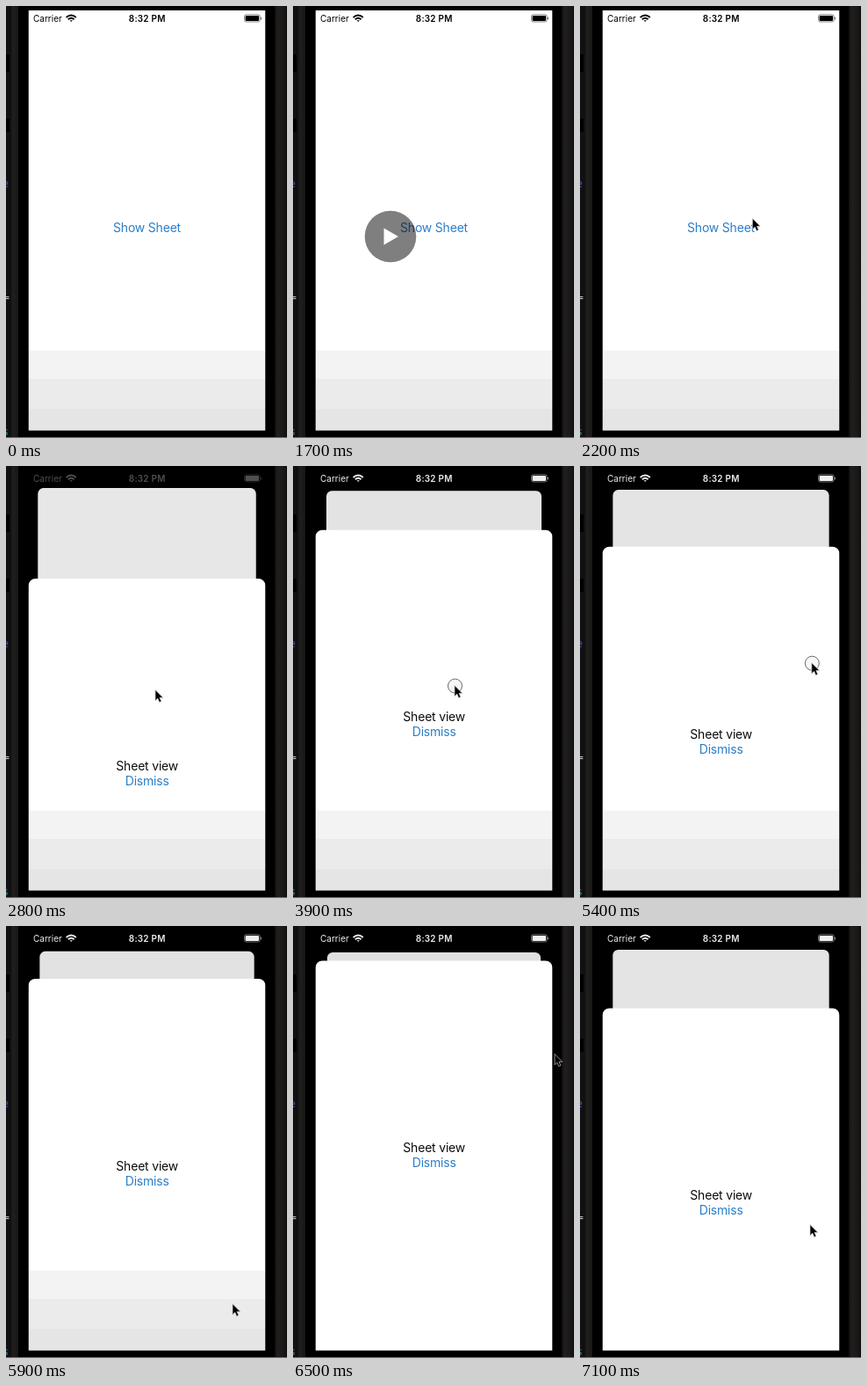
An HTML page that plays this animation: 320x491 px, repeating every 7200 ms.

```html
<!DOCTYPE html>
<html lang="en">
<head>
<meta charset="utf-8">
<title>Sheet demo</title>
<style>
  html, body { margin: 0; width: 100%; height: 100%; overflow: hidden; background: #000; }
  svg { display: block; width: 320px; height: 491px; font-family: Inter, Roboto, sans-serif; }
  .label { font-size: 14px; letter-spacing: -.2px; text-anchor: middle; fill: #0c0c0c; }
  .link { fill: #2a7ec9; }
  .status { font-size: 10px; }
  .code { font: 12px "DejaVu Sans Mono", monospace; text-anchor: end; }
</style>
</head>
<body>
<svg viewBox="0 0 320 491">
  <defs>
    <clipPath id="screen"><rect x="25.5" y="5" width="270" height="477.5"/></clipPath>
    <linearGradient id="rim">
      <stop offset="0" stop-color="#0b0b0a"/>
      <stop offset=".35" stop-color="#201f1d"/>
      <stop offset="1" stop-color="#171614"/>
    </linearGradient>
  </defs>

  <!-- editor behind the phone, and the phone's rim -->
  <rect width="320" height="491" fill="#111114"/>
  <text class="code" x="3" y="206" fill="#65489a">e</text>
  <text class="code" x="4" y="335" fill="#c8c8c8">=</text>
  <text class="code" x="3" y="488" fill="#3f8f85">s</text>
  <path d="M0 55h4v20h-4zM0 128h4v15h-4z" fill="#000"/>
  <rect x="4" width="11" height="490" fill="url(#rim)"/>
  <rect x="305" width="13" height="490" fill="url(#rim)"/>
  <rect x="14" width="292" height="490" fill="#000"/>
  <rect y="490" width="320" height="1" fill="#17b800"/>

  <g clip-path="url(#screen)">
    <g id="card">
      <rect id="page" x="-135" width="270" height="478" fill="#fff"/>
      <text id="show" class="label link" y="252.4">Show Sheet</text>
      <rect id="dim" x="-135" width="270" height="478"/>
    </g>
    <g id="status" class="status">
      <text x="31" y="17.7">Carrier</text>
      <text x="160.7" y="17.7" text-anchor="middle" font-weight="600" letter-spacing=".2">8:32 PM</text>
      <g fill="none" stroke="currentColor" stroke-width="1.9">
        <path d="M68.6 13q5.6-4.8 11.2 0M70.8 15.2q3.4-2.9 6.8 0"/>
        <path d="M72.5 16.3h3.4l-1.7 1.8z" fill="currentColor" stroke="none"/>
      </g>
      <rect x="271.5" y="9.8" width="17.6" height="8.2" rx="2.2" fill="none" stroke="currentColor" stroke-width=".8" opacity=".6"/>
      <rect x="272.6" y="10.9" width="15.4" height="6" rx="1.2"/>
      <rect x="289.8" y="12.4" width="1.1" height="3" rx=".5" opacity=".6"/>
    </g>
    <g id="sheet">
      <rect x="25.5" width="270" height="520" rx="8" fill="#fff"/>
      <text class="label" x="160.7" y="217.8">Sheet view</text>
      <text class="label link" x="160.7" y="234.8">Dismiss</text>
    </g>
    <g id="shade">
      <rect x="25" y="391.5" width="271" height="32.5" opacity=".047"/>
      <rect x="25" y="424" width="271" height="34" opacity=".077"/>
      <rect x="25" y="458" width="271" height="25" opacity=".1"/>
    </g>
  </g>

  <g id="play">
    <circle r="29.3" fill="#000" fill-opacity=".5"/>
    <path d="M-7.5-9.5v19L9 0z" fill="#fff"/>
  </g>
  <g id="cursor">
    <circle id="ring" cx=".5" cy="1" r="8" fill="#000" fill-opacity=".03" stroke="#6a6a6a"/>
    <path d="M0 .5v12.2l2.8-2.6 1.9 4.4 2.2-1L5 9.3h3.8z" stroke="#ccc" stroke-width=".7"/>
  </g>
</svg>
<script>
  const LOOP = 7200, STEP = 100;
  const REST = 39.5, TRAVEL = 443, RISE_START = 2662, SPRING_RATE = 0.0217;
  const PULL_LIMIT = 70, PULL_SOFTNESS = 50;

  // Where the pointer turns
  const stops = [
    { t: 1800, x: 272, y: 204 }, { t: 2400, x: 170, y: 254 }, { t: 3200, x: 170, y: 254 },
    { t: 3500, x: 182, y: 204 }, { t: 3700, x: 186, y: 290 }, { t: 3900, x: 184, y: 249 },
    { t: 4500, x: 190, y: 300 }, { t: 4800, x: 265, y: 90 }, { t: 5000, x: 268, y: 76 },
    { t: 5900, x: 258, y: 429 }, { t: 6400, x: 306, y: 120 }, { t: 6600, x: 290, y: 170 },
    { t: 7100, x: 262, y: 339 }
  ];
  const tap = { press: 2500, release: 2600 };
  const drags = [{ press: 3500, release: 4500 }, { press: 5000, release: 5795 }, { press: 6600, release: 7100 }];

  const set = (id, attrs) => {
    const node = document.getElementById(id);
    for (const key in attrs) node.setAttribute(key, attrs[key]);
  };
  const clamp = v => Math.min(1, Math.max(0, v));
  const smooth = v => v * v * (3 - 2 * v);
  const fade = (t, from) => clamp((t - from) / 300);
  const held = (t, { press, release }) => t >= press && t < release;

  // Critically damped: 1 at the start, settling to 0
  function spring(elapsed) {
    const k = Math.max(0, elapsed) * SPRING_RATE;
    return (1 + k) * Math.exp(-k);
  }

  function pointerAt(t) {
    const next = stops.findIndex(stop => stop.t > t);
    if (next === 0) return stops[0];
    const b = stops.at(next), a = next < 0 ? b : stops[next - 1];
    const p = a === b ? 0 : smooth((t - a.t) / (b.t - a.t));
    return { x: a.x + (b.x - a.x) * p, y: a.y + (b.y - a.y) * p };
  }

  // The sheet follows a drag with growing resistance, then springs back
  function pullAt(t) {
    const drag = drags.findLast(d => d.press <= t);
    if (!drag) return 0;
    const moved = pointerAt(Math.min(t, drag.release)).y - pointerAt(drag.press).y;
    const distance = Math.max(0, moved);
    return PULL_LIMIT * distance / (distance + PULL_SOFTNESS) * spring(t - drag.release);
  }

  function draw(t) {
    const offset = TRAVEL * spring(t - RISE_START) + pullAt(t);
    const shown = clamp(1 - offset / TRAVEL);
    const rx = Math.min(7, 10 * shown);
    set('sheet', { transform: `translate(0 ${REST + offset})` });
    set('card', { transform: `translate(160.5 ${5 + 25 * shown}) scale(${1 - 0.1 * shown})` });
    set('page', { rx });
    set('dim', { rx, opacity: 0.12 * shown });
    set('show', { opacity: held(t, tap) ? 0.35 : 1 });

    const level = 238 * fade(t, 2700);
    const ink = `rgb(${level},${level},${level})`;
    set('status', { fill: ink, color: ink });
    set('shade', { opacity: 1 - fade(t, 4100) + fade(t, 4900) - fade(t, 5900) });

    const grow = (t - 1700) / 500;
    set('play', {
      transform: `translate(111 262) scale(${1 + 0.77 * clamp(grow)})`,
      opacity: grow < 0 ? 0 : 1 - clamp(grow)
    });

    const { x, y } = pointerAt(t);
    set('cursor', { transform: `translate(${x} ${y})`, opacity: t < stops[0].t ? 0 : 1 });
    set('ring', { opacity: [tap, ...drags].some(touch => held(t, touch)) ? 1 : 0 });
  }

  function tick() {
    const t = performance.now() % LOOP;
    draw(Math.floor(t / STEP) * STEP);
    requestAnimationFrame(tick);
  }
  tick();
</script>
</body>
</html>
```
